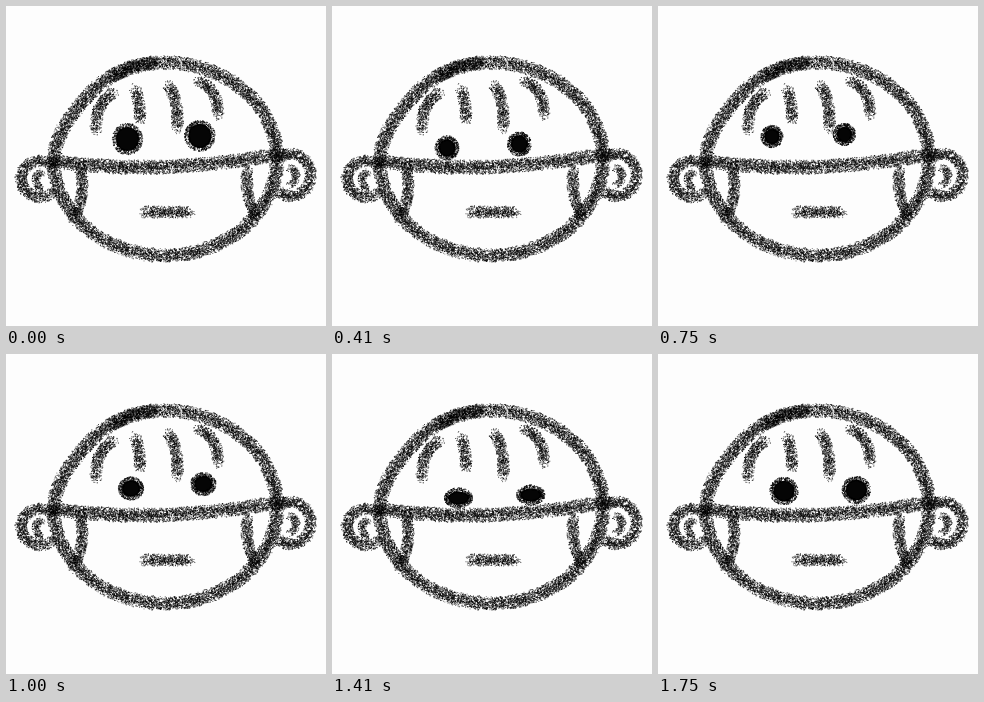
An HTML page with a canvas that plays this animation: 320x320 px, repeating every 10000 ms.

```html
<!DOCTYPE html>
<html lang="en">
<head>
<meta charset="utf-8">
<title>Rolling eyes</title>
<style>
  html, body { margin: 0; width: 100%; height: 100%; overflow: hidden; background: #fdfdfd; }
  canvas { display: block; width: 100vw; height: 100vh; }
</style>
</head>
<body>
<canvas id="stage" width="320" height="320"></canvas>
<script>
const SIZE = 320, LOOP = 10000, LAST = 21, TAU = Math.PI * 2;
const ctx = document.getElementById('stage').getContext('2d');

function seeded(seed) {
  return () => {
    seed = (seed + 0x6D2B79F5) | 0;
    let t = Math.imul(seed ^ (seed >>> 15), 1 | seed);
    t = (t + Math.imul(t ^ (t >>> 7), 61 | t)) ^ t;
    return ((t ^ (t >>> 14)) >>> 0) / 4294967296;
  };
}

// Curves map t in 0..1 to a point
const arc = (cx, cy, rx, ry, from, to) => t => {
  const q = from + (to - from) * t;
  return [cx + rx * Math.cos(q), cy + ry * Math.sin(q)];
};

// Parabola through three points
const bend = (x0, y0, x1, y1, x2, y2) => t => {
  const a = (1 - t) * (1 - 2 * t), b = 4 * t * (1 - t), c = t * (2 * t - 1);
  return [a * x0 + b * x1 + c * x2, a * y0 + b * y1 + c * y2];
};

// Ellipse, slightly flattened at the upper left
const skull = (from, to) => t => {
  const q = from + (to - from) * t;
  const d = (q % TAU - 3.75) / 0.45, r = 1 - 0.055 * Math.exp(-d * d);
  return [159 + 112 * r * Math.cos(q), 153 + 96.5 * r * Math.sin(q)];
};

const face = [
  [48, 155, 155, 161, 273, 148],
  [74, 163, 76, 188, 67, 214],
  [241, 162, 242, 187, 250, 211]
];

const poses = [
  {
    seed: 11, line: 13, thin: 11, sweep: [4.2, TAU + 4.63],
    ears: [[34, 173, 19, 18], [285, 169, 20, 21]],
    marks: [
      [108, 87, 94, 101, 90, 125],
      [129, 83, 133, 98, 134, 114],
      [162, 79, 170, 98, 171, 122],
      [192, 75, 207, 87, 212, 110],
      [138, 206, 161, 206, 184, 206]
    ]
  },
  {
    seed: 29, line: 11.5, thin: 9.5, sweep: [4.4, TAU + 4.4],
    ears: [[35, 175, 19, 20], [285, 168, 20, 21]],
    marks: [
      [107, 88, 94, 106, 90, 130],
      [127, 87, 132, 98, 136, 111],
      [164, 79, 172, 99, 173, 121],
      [191, 75, 210, 88, 210, 114],
      [142, 208, 161, 207, 180, 205]
    ]
  }
];

// step, left eye x and y, radii, height of the right eye against the left
const eyeKeys = [
  [0, 121.5, 133, 14.5, 15, -3],
  [2, 122.5, 140, 13, 13, -3],
  [5, 115, 142, 11.3, 11.5, -4],
  [9, 114, 130.5, 10.5, 10.5, -2],
  [12, 125, 134.5, 12, 11, -4.5],
  [17, 126.5, 144, 13.5, 9.5, -3],
  [21, 126, 137, 13.5, 13.3, -1]
];

function speck(g, x, y, alpha) {
  g.fillStyle = `rgba(0,0,0,${alpha})`;
  g.fillRect(x - 0.5, y - 0.5, 1, 1);
}

function crayon(g, curve, width, rand) {
  let length = 0, last = curve(0);
  for (let i = 1; i <= 40; i++) {
    const p = curve(i / 40);
    length += Math.hypot(p[0] - last[0], p[1] - last[1]);
    last = p;
  }
  for (let n = length * width * 1.3; n > 0; n--) {
    const [x, y] = curve(rand());
    const r = width * 0.56 * Math.pow(rand(), 0.58), q = rand() * TAU;
    speck(g, x + r * Math.cos(q), y + r * Math.sin(q), 0.4 + 0.55 * rand());
  }
}

function drawHead({ seed, line, thin, sweep, ears, marks }) {
  const layer = document.createElement('canvas');
  layer.width = layer.height = SIZE;
  const g = layer.getContext('2d'), rand = seeded(seed);
  const draw = (curve, width) => crayon(g, curve, width, rand);
  g.fillStyle = '#fdfdfd';
  g.fillRect(0, 0, SIZE, SIZE);
  draw(skull(...sweep), line);
  face.forEach((p, i) => draw(bend(...p), i ? thin : line));
  ears.forEach(([x, y, rx, ry], i) => {
    const mid = i ? 0 : Math.PI;
    draw(arc(x, y, rx, ry, mid - 2.25, mid + 2.25), thin);
    draw(arc(x + (i ? -1 : 2), y + 1.5, 6, 8, mid - 1.5, mid + 1.5), 8);
  });
  marks.forEach(p => draw(bend(...p), thin));
  return layer;
}

function drawEye(x, y, rx, ry, rand) {
  ctx.fillStyle = '#050505';
  ctx.beginPath();
  ctx.ellipse(x, y, rx - 3, ry - 3, 0, 0, TAU);
  ctx.fill();
  for (let n = 0; n < 520; n++) {
    const q = rand() * TAU, inset = 5 * rand() - 0.8;
    speck(ctx, x + (rx - inset) * Math.cos(q), y + (ry - inset) * Math.sin(q), 0.5 + 0.5 * rand());
  }
}

// Smooth path through the keys, at rest at both ends
function eyesAt(step) {
  let i = 0;
  while (i < eyeKeys.length - 2 && eyeKeys[i + 1][0] <= step) i++;
  const a = eyeKeys[i], b = eyeKeys[i + 1], span = b[0] - a[0], t = (step - a[0]) / span;
  const slope = (j, k) => {
    const p = eyeKeys[j - 1], n = eyeKeys[j + 1];
    return p && n ? (n[k] - p[k]) / (n[0] - p[0]) * span : 0;
  };
  const ease = t * t * (3 - 2 * t);
  return a.map((v, k) => v + (b[k] - v) * ease
    + slope(i, k) * t * (1 - t) * (1 - t) - slope(i + 1, k) * t * t * (1 - t));
}

const heads = poses.map(drawHead);
const start = performance.now();
let shown = -1;

function render() {
  const tick = Math.floor(((performance.now() - start) % LOOP) / 10);
  // 12 steps a second, starting on whole hundredths
  const step = Math.min(LAST, Math.ceil(3 * (tick + 1) / 25) - 1);
  if (step !== shown) {
    shown = step;
    ctx.drawImage(heads[(step >> 1) % 2], 0, 0);
    const [, x, y, rx, ry, lift] = eyesAt(step), rand = seeded(100 + step);
    drawEye(x, y, rx, ry, rand);
    drawEye(x + 72.3, y + lift, rx, ry, rand);
  }
  requestAnimationFrame(render);
}
render();
</script>
</body>
</html>
```
